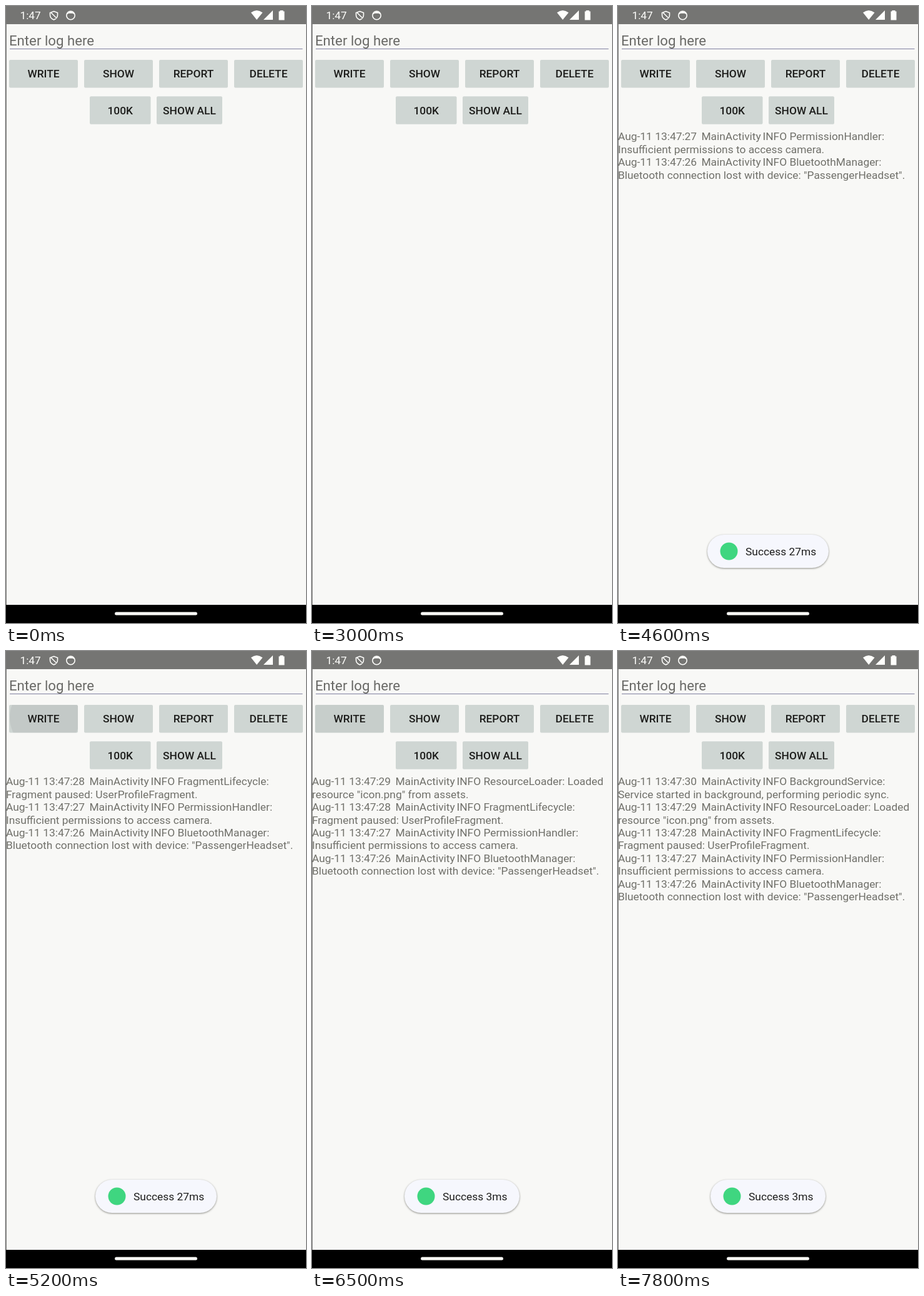
An HTML page that plays this animation: 480 by 985 pixels, repeating every 8 s.

```html
<!DOCTYPE html>
<html lang="en">
<head>
<meta charset="utf-8">
<title>Log screen</title>
<style>
  html, body { margin: 0; width: 100%; height: 100%; overflow: hidden; background: #f8f8f6; }
  svg { display: block; width: 100%; height: 100%; font: 17.36px Roboto, sans-serif; }
  .label { font-weight: 500; fill: #1c1c1a; text-anchor: middle; }
  .hint { font-size: 22.2px; fill: #696966; }
  #log { fill: #70706a; }
  #pill { fill: #f6f7fd; filter: drop-shadow(0 1px 1.5px rgba(70, 70, 60, .6)); }
</style>
</head>
<body>
<svg viewBox="0 0 480 985">
  <rect width="480" height="985" fill="#f8f8f6"/>
  <rect y="29" width="1" height="927" fill="#80807e"/>

  <rect width="480" height="29" fill="#757573"/>
  <g fill="#fffffc">
    <text x="22.5" y="21" font-size="17.2">1:47</text>
    <g fill="none" stroke="#fffffc" stroke-width="1.6">
      <path d="M76.5 8.5L82.5 10.7V14.5C82.5 18 80 20.7 76.5 22C73 20.7 70.5 18 70.5 14.5V10.7ZM72 10.5L81 19.5"/>
      <circle cx="103.5" cy="15" r="6.7"/>
    </g>
    <path d="M97.5 13.5A6.3 6.3 0 0 1 109.5 13.5L106.5 11.8H100.5Z"/>
    <path d="M392 10.5Q401 3.5 410.5 10.5L401.2 22Z"/>
    <path d="M427 7V22H412Z"/>
    <path d="M438.5 8.5V7H443.5V8.5H445.5V22.5H436.5V8.5Z"/>
  </g>

  <text class="hint" x="5" y="63">Enter log here</text>
  <rect x="6" y="68" width="468.5" height="1" fill="#8080a0"/>

  <clipPath id="writeBox"><rect x="5" y="86" width="110" height="44.5" rx="2"/></clipPath>
  <g id="boxes" fill="#cfd6d3"></g>
  <circle id="ripple" cx="62" cy="106" clip-path="url(#writeBox)"/>
  <g id="labels" class="label"></g>
  <g id="log"></g>

  <g id="toast">
    <rect id="pill" y="-26.5" height="53" rx="26.5"/>
    <g id="content">
      <circle id="icon" r="14" fill="#3fd680"/>
      <text id="message" y="6.5" fill="#1d1d1c"></text>
    </g>
  </g>

  <rect y="956" width="480" height="29" fill="#000"/>
  <rect x="174" y="967.5" width="132" height="5" rx="2.5" fill="#fdfdf8"/>
</svg>
<script>
const LOOP = 8000, STEP = 100, LINE = 20.43;
const $ = id => document.getElementById(id);
const clamp = v => Math.max(0, Math.min(1, v));

function add(parent, tag, attrs, text = '') {
  const el = document.createElementNS('http://www.w3.org/2000/svg', tag);
  set(el, attrs);
  el.textContent = text;
  parent.append(el);
  return el;
}

function set(el, attrs) {
  for (const key in attrs) el.setAttribute(key, attrs[key]);
}

const buttons = [
  ['WRITE', 5, 86, 110], ['SHOW', 125, 86, 110], ['REPORT', 245, 86, 110],
  ['DELETE', 365, 86, 110], ['100K', 134, 144.3, 97.5], ['SHOW ALL', 241, 144.3, 105]
];
for (const [name, x, y, width] of buttons) {
  add($('boxes'), 'rect', { x, y, width, height: 44.5, rx: 2 });
  add($('labels'), 'text', { x: x + width / 2, y: y + 28.3 }, name);
}

const presses = [3000, 3900, 5000, 6000, 7000];
const entries = [
  [3100, 'BluetoothManager:', 'Bluetooth connection lost with device: "PassengerHeadset".'],
  [4100, 'PermissionHandler:', 'Insufficient permissions to access camera.'],
  [5100, 'FragmentLifecycle:', 'Fragment paused: UserProfileFragment.'],
  [6100, 'ResourceLoader: Loaded', 'resource "icon.png" from assets.'],
  [7100, 'BackgroundService:', 'Service started in background, performing periodic sync.']
];
const rows = entries.map(([, head, body], i) => {
  const g = add($('log'), 'g', {});
  const line = add(g, 'text', { y: 214.3 }, `Aug-11 13:47:${26 + i} `);
  add(line, 'tspan', { dx: 3 }, 'MainActivity ');
  add(line, 'tspan', { dx: -1.5 }, `INFO ${head}`);
  add(g, 'text', { y: 214.3 + LINE }, body);
  return g;
});

const toasts = [
  { text: 'Success 27ms', width: 194, start: 3450, end: 5350 },
  { text: 'Success 3ms', width: 184, start: 5760, end: Infinity }
];

function drawLog(t) {
  const count = entries.filter(e => t >= e[0]).length;
  rows.forEach((row, i) => set(row, {
    visibility: i < count ? 'visible' : 'hidden',
    transform: `translate(0 ${(count - 1 - i) * 2 * LINE})`
  }));
}

function drawRipple(t) {
  const age = t - (presses.findLast(p => t >= p) ?? -LOOP);
  set($('ripple'), {
    r: 70 * clamp(age / 250),
    opacity: 0.06 * clamp((700 - age) / 300)
  });
}

function drawToast(t) {
  const toast = toasts.findLast(o => t >= o.start);
  const shown = toast ? clamp((t - toast.start) / 250) * clamp(1 - (t - toast.end) / 250) : 0;
  set($('toast'), { visibility: shown ? 'visible' : 'hidden' });
  if (!shown) return;
  const left = -toast.width / 2;
  const scale = 1 - 0.04 * (1 - shown) ** 2;
  set($('toast'), { transform: `translate(240 870.5) scale(${scale})` });
  set($('pill'), { x: left, width: toast.width, opacity: clamp(shown * 6) });
  set($('content'), { opacity: shown });
  set($('icon'), { cx: left + 34.5 });
  set($('message'), { x: left + 61 });
  $('message').textContent = toast.text;
}

function frame() {
  const t = Math.floor(performance.now() % LOOP / STEP) * STEP;
  drawLog(t);
  drawRipple(t);
  drawToast(t);
  requestAnimationFrame(frame);
}
frame();
</script>
</body>
</html>
```
